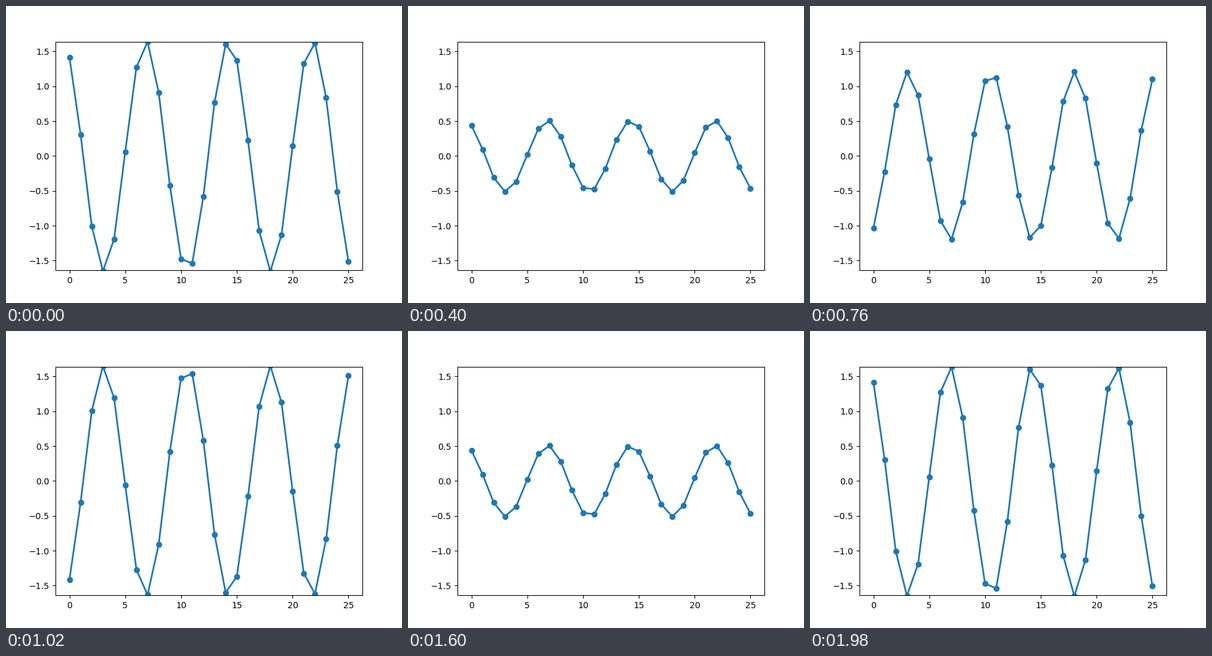
Write a matplotlib script that moves like this. It is 640 by 480 pixels and loops after 2000 ms.

```python
import numpy as np
import matplotlib.pyplot as plt
from matplotlib.animation import FuncAnimation

FRAMES = 100
INTERVAL = 20

# Standing wave sampled at 26 sites
AMPLITUDE = 1.655
WAVENUMBER = 0.8412
PHASE = 0.543

sites = np.arange(26)
shape = AMPLITUDE * np.cos(WAVENUMBER * sites + PHASE)

fig, ax = plt.subplots(figsize=(6.4, 4.8), dpi=100)
line, = ax.plot(sites, shape, "o-", lw=2)
ax.set_xlim(-1.25, 26.25)
ax.set_ylim(-1.64, 1.64)


def update(frame):
    line.set_ydata(shape * np.cos(2 * np.pi * frame / FRAMES))
    return line,


anim = FuncAnimation(fig, update, frames=FRAMES, interval=INTERVAL,
                     repeat=True, repeat_delay=0)
plt.show()
```
